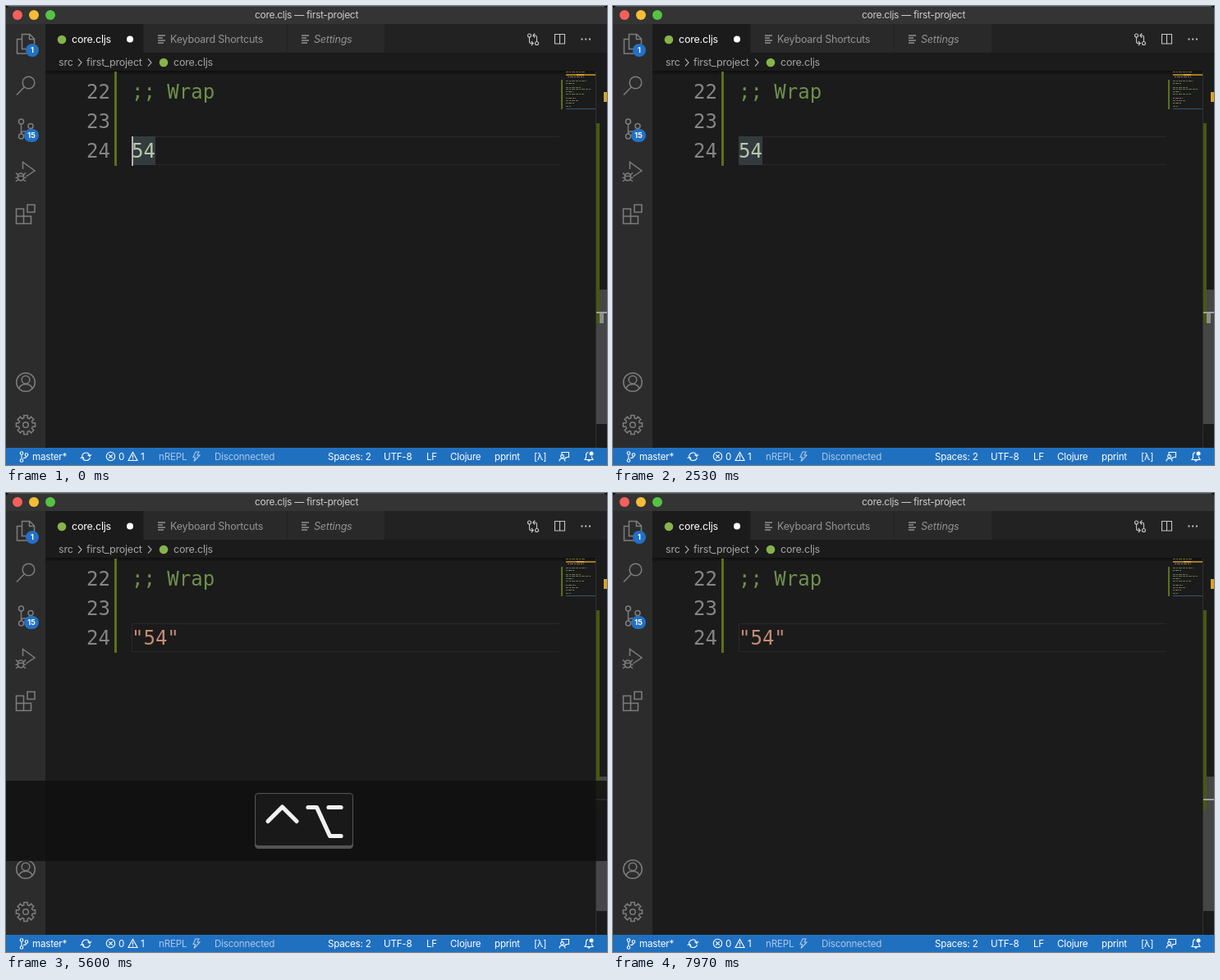
An HTML page for the animation above (8 s loop, 732 by 560 pixels).

```html
<!DOCTYPE html>
<html lang="en">
<head>
<meta charset="utf-8">
<title>Editor: wrapping a form</title>
<style>
html, body { margin: 0; width: 100%; height: 100%; overflow: hidden; background: #000; }
svg { display: block; }
text { white-space: pre; }
.ui { font: 12.5px Inter, sans-serif; letter-spacing: -.2px; fill: #a5a5a5; }
.status { font: 11.6px Inter, sans-serif; letter-spacing: -.2px; fill: #fff; }
.badge { font: bold 9px Inter, sans-serif; fill: #fff; text-anchor: middle; }
.code { font: 24px "DejaVu Sans Mono", monospace; fill: #858585; }
.icon { fill: none; stroke: #7d7d7d; stroke-width: 1.5; }
.small { fill: none; stroke: #c5c5c5; stroke-width: 1.1; }
.status-icon { fill: none; stroke: #fff; stroke-width: 1.1; }
.dim { opacity: .62; }
.glyph { fill: none; stroke: #f2f2f2; stroke-width: 5.2; stroke-linecap: round; stroke-linejoin: round; }
</style>
</head>
<body>
<svg width="732" height="560" viewBox="0 0 732 560">
  <defs>
    <linearGradient id="shade" x2="0" y2="1">
      <stop stop-color="#000" stop-opacity=".5"/><stop offset="1" stop-color="#000" stop-opacity="0"/>
    </linearGradient>
    <path id="list" class="small" d="M0 .5h9M0 3.5h6M0 6.5h9M0 9.5h7"/>
    <path id="chevron" class="small" d="M0 0l4 4.5l-4 4.5"/>
  </defs>

  <!-- Window and title bar -->
  <path d="M0 560V5Q0 0 5 0H727Q732 0 732 5V560Z" fill="#1b1b1b"/>
  <path d="M0 22V5Q0 0 5 0H727Q732 0 732 5V22Z" fill="#343434"/>
  <path d="M4 .5H728" stroke="#555"/>
  <circle cx="14" cy="11" r="6" fill="#f4605a"/>
  <circle cx="34" cy="11" r="6" fill="#f5bd35"/>
  <circle cx="54" cy="11" r="6" fill="#55c344"/>
  <text class="ui" x="366" y="15.3" text-anchor="middle" style="font-size:12px;letter-spacing:-.3px;fill:#ccc">core.cljs — first-project</text>

  <!-- Tabs -->
  <rect x="48" y="22" width="684" height="35" fill="#222223"/>
  <rect x="48" y="22" width="119" height="35" fill="#1b1b1b"/>
  <path d="M168 22H342V57H168ZM343 22H461V57H343Z" fill="#292929"/>
  <circle cx="68" cy="41" r="5.3" fill="#86b34a"/>
  <text class="ui" x="80" y="45.3" style="fill:#fff">core.cljs</text>
  <circle cx="151" cy="40.5" r="4" fill="#fff"/>
  <use href="#list" x="185" y="35.5"/>
  <text class="ui" x="200" y="45.3" style="fill:#939393">Keyboard Shortcuts</text>
  <use href="#list" x="360" y="35.5"/>
  <text class="ui" x="375" y="45.3" style="fill:#939393;font-style:italic">Settings</text>
  <g class="small">
    <circle cx="637.5" cy="36" r="2"/><circle cx="646.5" cy="45.5" r="2"/>
    <path d="M637.5 38V43.5Q637.5 45.5 639.5 45.5H642M639.8 43L642.3 45.5L639.8 48M646.5 43.5V38Q646.5 36 644.5 36H642M644.3 33.5L641.8 36L644.3 38.5M668.5 34.5H680.5V46H668.5ZM674.5 34.5V46"/>
  </g>
  <path d="M700.5 40.5h2M705.2 40.5h2M709.9 40.5h2" stroke="#c5c5c5" stroke-width="2"/>

  <!-- Breadcrumbs -->
  <g class="ui">
    <text x="64" y="73.3">src</text>
    <text x="98" y="73.3">first_project</text>
    <text x="204" y="73.3">core.cljs</text>
  </g>
  <use href="#chevron" x="88" y="64.5"/>
  <use href="#chevron" x="173" y="64.5"/>
  <circle cx="192" cy="69" r="5.3" fill="#86b34a"/>
  <rect x="48" y="79" width="670" height="5" fill="url(#shade)"/>

  <!-- Activity bar -->
  <rect y="22" width="48" height="517" fill="#2c2c2c"/>
  <g class="icon">
    <path d="M19.5 34.5H29L34.5 40V52.5H19.5ZM28.5 34.5V40.5H34.5M19 40.5H13.5V58H27.5V53"/>
    <circle cx="27.5" cy="93.5" r="7.3"/><path d="M22.3 98.8L13 108.5"/>
    <circle cx="18.5" cy="141" r="3"/><circle cx="18.5" cy="159" r="3"/><circle cx="30" cy="146.5" r="3"/>
    <path d="M18.5 144V156M30 149.5Q30 153 26 153H22Q18.5 153 18.5 156"/>
    <path d="M20.5 199V190.5L35 201L24.5 208"/>
    <path d="M14.5 206Q18 202 21.5 206V209Q21.5 213 18 213Q14.5 213 14.5 209ZM14.5 207.5H21.5M12 203.5L14.5 206M24 203.5L21.5 206M11.5 209.5H14.5M21.5 209.5H24.5M12 214L15 211.5M24 214L21 211.5"/>
    <path d="M12.5 247.5H21.5V256.5H30.5V265.5H12.5ZM12.5 256.5H21.5V265.5M26 242.5H35V251.5H26Z"/>
    <circle cx="24" cy="459" r="11.3"/><circle cx="24" cy="456" r="4.8"/><path d="M16 467Q17 461.5 24 461.5Q31 461.5 32 467"/>
    <circle cx="24" cy="511" r="3.3"/><path id="gear"/>
  </g>
  <circle cx="32" cy="54" r="8" fill="#2271c4"/>
  <text class="badge" x="32" y="57.3">1</text>
  <rect x="22" y="150" width="18" height="16" rx="8" fill="#2271c4"/>
  <text class="badge" x="31" y="161.3">15</text>

  <!-- Code -->
  <rect x="132" y="80" width="3" height="115" fill="#5b701d"/>
  <path d="M674 159.5H153.5V193.5H674" fill="none" stroke="#292929"/>
  <rect id="selection" x="153" y="159" width="29" height="35" fill="#343b3e"/>
  <g class="code">
    <text x="98" y="113">22</text><text x="98" y="149">23</text><text x="98" y="185">24</text>
    <text x="153" y="113" style="fill:#6f8f4c">;; Wrap</text>
    <text id="form" x="153" y="185"/>
  </g>
  <rect id="cursor" x="153" y="159" width="2" height="36" fill="#b0b1af"/>

  <!-- Minimap and overview ruler -->
  <rect x="676" y="90" width="2" height="36" fill="#5b701d"/>
  <rect x="682" y="83" width="36" height="2" fill="#a57a22"/>
  <rect x="695" y="83" width="9" height="2" fill="#d8a02e"/>
  <path id="minimap" fill="none" stroke="#62753f" stroke-dasharray="3 1 2 1 4 1"/>
  <path d="M684 86.5h20M682 94.5h10M682 104.5h9M682 112.5h12M682 118.5h10" stroke="#77736a" stroke-dasharray="2 1 4 1"/>
  <path d="M682 125.5H718" stroke="#315673"/>
  <path d="M718.5 80V539" stroke="#303030"/>
  <rect x="719" y="346" width="13" height="164" fill="#464646"/>
  <rect x="719" y="143" width="4" height="244" fill="#475713"/>
  <rect x="728" y="105" width="4" height="12" fill="#d6a326"/>
  <rect x="719" y="373" width="13" height="2" fill="#a0a0a0"/>
  <rect id="selection-mark" x="723" y="375" width="5" height="12" fill="#8d8d8d"/>

  <!-- Status bar -->
  <rect y="539" width="732" height="21" fill="#2070c0"/>
  <g class="status-icon">
    <circle cx="19" cy="545.5" r="1.8"/><circle cx="19" cy="554.5" r="1.8"/><circle cx="25" cy="547.5" r="1.8"/>
    <path d="M19 547.5V552.5M25 549.5Q25 551.5 21 551.5"/>
    <path d="M92.5 549Q94 544.8 98 545Q101 545.2 102 549M99.5 547.5L102 549.5L104 547M102.5 551Q101 554.8 97 554.5Q94 554.3 93 550.5M95 552L92.8 549.8L90.8 552"/>
    <circle cx="127.5" cy="549.5" r="5.2"/><path d="M125.3 547.3L129.7 551.7M129.7 547.3L125.3 551.7"/>
    <path d="M154.5 544.5L160 554.5H149ZM154.5 547.8V551.2M154.5 552V553.2"/>
    <path class="dim" d="M231 544H235L233 548H236L229 555.5L230.5 550.5H228Z"/>
    <path d="M677 548V544.5H685.5V550.5H683L681 552V550.5"/><circle cx="677.5" cy="549.5" r="1.9"/><path d="M674 555.5Q674 552 677.5 552Q681 552 681 555.5"/>
    <path d="M709 544.5Q706.5 545 706.5 548V551L705 553.5H715L713.5 551V549.5M708.7 554Q710 556.5 711.3 554"/>
  </g>
  <circle cx="713" cy="546" r="2.5" fill="#fff"/>
  <g class="status">
    <text x="32" y="553.8">master*</text>
    <text x="137" y="553.8">0</text>
    <text x="164" y="553.8">1</text>
    <text x="186" y="553.8" class="dim">nREPL</text>
    <text x="254" y="553.8" class="dim">Disconnected</text>
    <text x="392" y="553.8">Spaces: 2</text>
    <text x="460" y="553.8">UTF-8</text>
    <text x="512" y="553.8">LF</text>
    <text x="541" y="553.8">Clojure</text>
    <text x="595" y="553.8">pprint</text>
    <text x="643" y="553.8">[λ]</text>
  </g>

  <!-- Keystroke display -->
  <g id="keystroke">
    <rect y="351" width="732" height="98" fill="#101010" fill-opacity=".84"/>
    <g id="arrow-key">
      <rect x="328" y="366" width="70" height="68" rx="4.5" fill="#555"/>
      <rect x="329" y="367" width="68" height="63" rx="3.5" fill="#191919"/>
      <path class="glyph" d="M346 401H381M360 386.5L345 401L360 415.5"/>
    </g>
    <g id="modifier-keys">
      <rect x="303" y="366" width="120" height="68" rx="4.5" fill="#555"/>
      <rect x="304" y="367" width="118" height="63" rx="3.5" fill="#191919"/>
      <path class="glyph" d="M319 400.5L336.5 383L354 400.5M368 383.5H378.5L394.5 418.5H408M393 383.5H408"/>
    </g>
  </g>
</svg>
<script>
const LOOP = 8000, WRAP = 2700;
const ARROW = [2900, 4000], MODIFIERS = [5100, 6200];
const FADE = 150;
const $ = id => document.getElementById(id);
const show = (id, visible) => $(id).setAttribute('visibility', visible ? 'inherit' : 'hidden');
const within = (t, [start, end]) => t >= start && t < end;

// Eight teeth, four corners each.
$('gear').setAttribute('d', 'M' + Array.from({ length: 32 }, (_, i) => {
  const radius = i % 4 < 2 ? 11.8 : 8.6;
  const angle = (Math.floor(i / 4) + [-.25, .25, .33, .67][i % 4]) * Math.PI / 4;
  return `${24 + radius * Math.cos(angle)} ${511 + radius * Math.sin(angle)}`;
}).join('L') + 'Z');

$('minimap').setAttribute('d',
  [[80, 23], [91, 25], [99, 18], [101, 31], [107, 22], [115, 16], [122, 7]]
    .map(([y, width]) => `M682 ${y}.5h${width}`).join(''));

function draw(now) {
  const t = now % LOOP;
  const wrapped = t >= WRAP;
  $('form').textContent = wrapped ? '"54"' : '54';
  $('form').style.fill = wrapped ? '#c48b74' : '#b6c9aa';
  show('selection', !wrapped);
  show('selection-mark', !wrapped);
  show('cursor', t % 1000 < 530);

  const span = [ARROW, MODIFIERS].find(range => within(t, range));
  show('arrow-key', span === ARROW);
  show('modifier-keys', span === MODIFIERS);
  $('keystroke').setAttribute('opacity', span ? Math.min(1, (span[1] - t) / FADE) : 0);
}

const start = performance.now();
function tick() {
  draw(performance.now() - start);
  requestAnimationFrame(tick);
}
tick();
</script>
</body>
</html>
```
